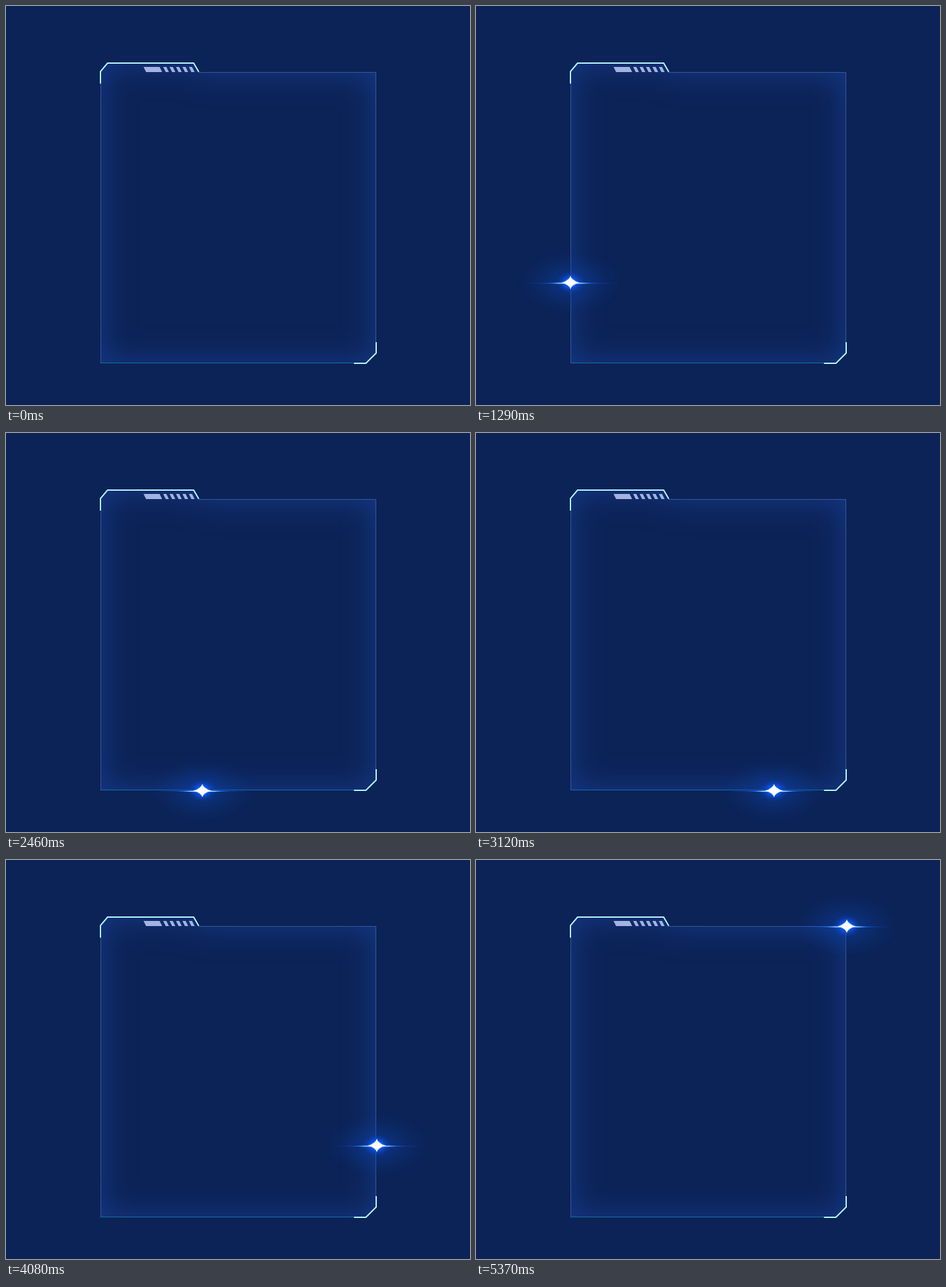
Write an HTML page that moves like this. It is 722 px wide and 622 px high and loops after 5400 ms.

```html
<!DOCTYPE html>
<html lang="en">
<head>
<meta charset="utf-8">
<title>Glowing panel</title>
<style>
  html, body { margin: 0; width: 100%; height: 100%; overflow: hidden; background: #0c2357; }
  svg { display: block; width: 722px; height: 622px; }

  .edge { fill: none; stroke: #38599a; }
  .base { stroke: #1272ac; }
  .accent { fill: none; stroke: #b6fbff; stroke-width: 2; stroke-linecap: square; }
  .bars { fill: #a2b3e1; }

  .spark { animation: travel 5400ms linear infinite, appear 5400ms step-end infinite; }

  @keyframes travel {
    0%      { transform: translate(147px, 110px); }
    33.333% { transform: translate(147px, 557px); }
    65%     { transform: translate(557px, 557px); }
    69%     { transform: translate(577px, 538.6px); }
    100%    { transform: translate(577px, 95px); }
  }
  /* the spark is absent for the first instant of each lap */
  @keyframes appear {
    0%   { opacity: 0; }
    0.5% { opacity: 1; }
  }
</style>
</head>
<body>
<svg viewBox="0 0 722 622" xmlns="http://www.w3.org/2000/svg">
  <defs>
    <clipPath id="panel">
      <path d="M147 102 L158 89 H292 L300 103 H576 V541 L560 557 H147 Z"/>
    </clipPath>
    <filter id="inset" filterUnits="userSpaceOnUse" x="0" y="0" width="722" height="622" color-interpolation-filters="sRGB">
      <feGaussianBlur stdDeviation="25"/>
    </filter>
    <filter id="soft" x="-50%" y="-50%" width="200%" height="200%">
      <feGaussianBlur stdDeviation="0.6"/>
    </filter>
    <radialGradient id="aura">
      <stop offset="0" stop-color="#0a50d8" stop-opacity=".55"/>
      <stop offset=".3" stop-color="#0b48bc" stop-opacity=".34"/>
      <stop offset=".65" stop-color="#0d45a4" stop-opacity=".16"/>
      <stop offset="1" stop-color="#0d409a" stop-opacity="0"/>
    </radialGradient>
    <radialGradient id="halo">
      <stop offset="0" stop-color="#1f7cff"/>
      <stop offset=".4" stop-color="#0a5cff" stop-opacity=".85"/>
      <stop offset=".7" stop-color="#0a50e4" stop-opacity=".3"/>
      <stop offset="1" stop-color="#0a4bd8" stop-opacity="0"/>
    </radialGradient>
    <radialGradient id="streak">
      <stop offset="0" stop-color="#fff"/>
      <stop offset=".45" stop-color="#bfe2ff"/>
      <stop offset=".7" stop-color="#2a86ff" stop-opacity=".85"/>
      <stop offset="1" stop-color="#0a55e8" stop-opacity="0"/>
    </radialGradient>
    <radialGradient id="tail">
      <stop offset="0" stop-color="#1668ff"/>
      <stop offset=".5" stop-color="#0f58e0" stop-opacity=".7"/>
      <stop offset="1" stop-color="#0c48b8" stop-opacity="0"/>
    </radialGradient>
  </defs>

  <g clip-path="url(#panel)">
    <path filter="url(#inset)" fill="#153a8a" fill-rule="evenodd"
      d="M0 0 H722 V622 H0 Z M147 102 L158 89 H292 L300 103 H576 V557 H147 Z"/>
  </g>

  <path class="edge" d="M147.5 121 V557 M300 103.5 H575.5 V525"/>
  <path class="edge base" d="M147 556.5 H542"/>

  <g class="bars">
    <path d="M214 95 H239 L243 103 H218 Z"/>
    <path id="bar" d="M244.5 95 H249.5 L253.5 103 H248.5 Z"/>
    <use href="#bar" x="10"/>
    <use href="#bar" x="20"/>
    <use href="#bar" x="30"/>
    <use href="#bar" x="40"/>
  </g>

  <path class="accent" d="M147 120 V102 L158 89 H292 L299.5 102"/>
  <path class="accent" d="M576 525 V541 L560 557 H542.5"/>

  <g class="spark">
    <ellipse rx="82" ry="50" fill="url(#aura)"/>
    <ellipse cy=".3" rx="21" ry="17" fill="url(#halo)"/>
    <ellipse cy="1.5" rx="72" ry="1" fill="url(#tail)"/>
    <ellipse cy="1.5" rx="42" ry="1.5" fill="url(#streak)"/>
    <g filter="url(#soft)" fill="#fff">
      <path d="M0 -10 Q1.6 -3 14 .8 Q1.6 4 0 11 Q-1.6 4 -14 .8 Q-1.6 -3 0 -10 Z"/>
      <ellipse cy=".3" rx="7.5" ry="5"/>
    </g>
  </g>
</svg>
</body>
</html>
```
